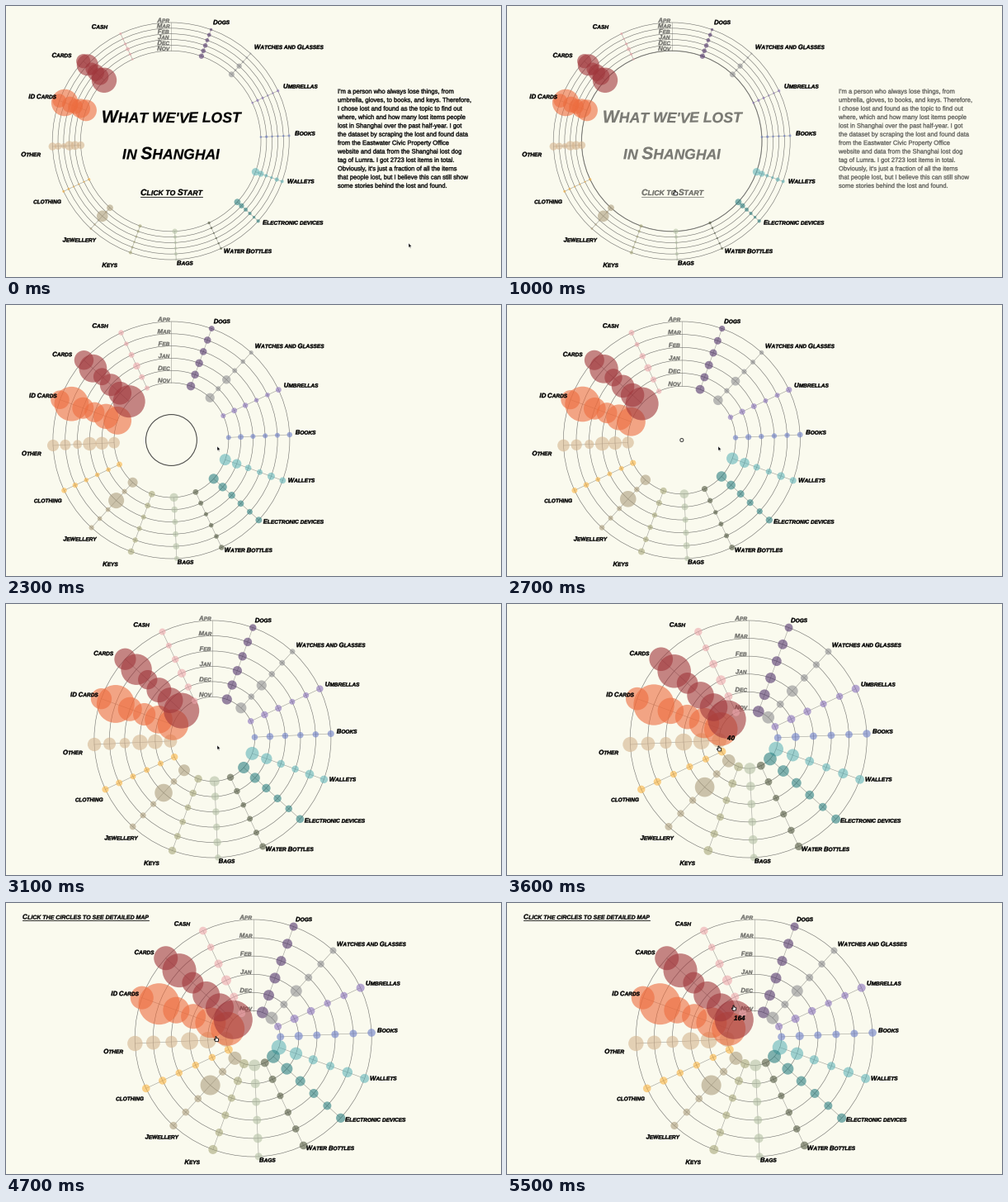
A matplotlib script that plays this animation: 600 px wide and 328 px high, repeating every 5.6 s.

```python
import math
import random

import matplotlib.pyplot as plt
import numpy as np
from matplotlib.animation import FuncAnimation
from matplotlib.patches import Circle, PathPatch, Polygon
from matplotlib.path import Path
from matplotlib.textpath import TextPath
from matplotlib.transforms import Affine2D

W, H, DPI = 600, 328, 100
STEP, FRAMES = 100, 56
BG = "#fafaee"
CX, CY, R_OUT = 199.7, 163.5, 143.5
R_START, R_MID, R_END = 109.3, 69.7, 33.0
HAND = {"family": "Liberation Sans", "weight": "bold", "style": "italic"}
BODY = {"family": "Liberation Sans"}
MONTHS = ["Nov", "Dec", "Jan", "Feb", "Mar", "Apr"]

# name, label x, label middle y, colour, final radius per month
ITEMS = [
    ("Dogs", 251, 19.5, "#52346c", [7, 6.5, 6.5, 6, 6, 5]),
    ("Watches and Glasses", 301, 49.5, "#8e8e91", [7.5, 4.5, 7, 4.5, 4.2, 4]),
    ("Umbrellas", 336, 97, "#8971bc", [4.5, 5, 4.8, 4.2, 4.3, 5]),
    ("Books", 350, 154, "#6c7dc8", [4.5, 5, 4.5, 4.5, 4.5, 4.8]),
    ("Wallets", 341, 212, "#61b4b9", [9, 7.6, 5.5, 5, 6.2, 5.5]),
    ("Electronic devices", 311, 262, "#2c8082", [8, 7, 6, 5.5, 5, 5.6]),
    ("Water Bottles", 264, 296.5, "#50573f", [5, 4.5, 4, 4.2, 4.3, 4.8]),
    ("Bags", 207, 311, "#b4c1a5", [7, 5.5, 5, 5, 5.5, 4.5]),
    ("Keys", 135, 313.5, "#a7a77a", [5.5, 5, 4.5, 4.5, 4.7, 5.5]),
    ("Jewellery", 109, 283, "#ad9e7d", [8, 4.6, 12, 4.3, 4.3, 4.6]),
    ("clothing", 67, 236.5, "#fab443", [5, 4.2, 4.2, 4.2, 4.7, 4.8]),
    ("Other", 42, 179.5, "#d5b48e", [9, 10, 10.5, 7.2, 8.5, 9.2]),
    ("ID Cards", 61, 109.5, "#ed6c3e", [20.5, 18.5, 15, 16, 25, 14]),
    ("Cards", 79.5, 59.5, "#a0363b", [23.5, 17, 16.5, 13, 20.5, 14.5]),
    ("Cash", 123, 25, "#eda7ac", [4.5, 5, 6, 5, 4.2, 4.8]),
]

STORY = """I'm a person who always lose things, from
umbrella, gloves, to books, and keys. Therefore,
I chose lost and found as the topic to find out
where, which and how many lost items people
lost in Shanghai over the past half-year. I got
the dataset by scraping the lost and found data
from the Eastwater Civic Property Office
website and data from the Shanghai lost dog
tag of Lumra. I got 2723 lost items in total.
Obviously, it's just a fraction of all the items
that people lost, but I believe this can still show
some stories behind the lost and found."""

random.seed(4)
fig = plt.figure(figsize=(W / DPI, H / DPI), dpi=DPI, facecolor=BG)
ax = fig.add_axes([0, 0, 1, 1])
ax.set_xlim(0, W)
ax.set_ylim(H, 0)
ax.axis("off")
wheel = Affine2D()


def px(width):
    return width * 72 / DPI


def reach(text, size):
    return TextPath((0, 0), text, size=size, prop=HAND).get_extents().x1


def lettering(text, size):
    """Small-caps marker lettering; returns its outline and width."""
    parts, x = [], 0
    for ch in text:
        s = size * (1.2 if ch.isupper() or ch.isdigit() else 1)
        if ch != " ":
            glyph = TextPath((0, 0), ch.upper(), size=s, prop=HAND)
            tilt = Affine2D().rotate_deg(random.uniform(-2, 2))
            tilt.translate(x, random.uniform(-0.02, 0.02) * size)
            parts.append(tilt.transform_path(glyph))
        x += reach(ch.upper() + "I", s) - reach("I", s)
    return Path.make_compound_path(*parts), x


def put(path, x, y, color="black", on_wheel=False, lw=0.0, z=6):
    path = Affine2D().scale(1, -1).translate(x, y).transform_path(path)
    patch = PathPatch(path, fc=color, ec=color, lw=px(lw), zorder=z)
    if on_wheel:
        patch.set_transform(wheel + ax.transData)
    return ax.add_patch(patch)


def write(text, x, y, size, align=0.0, **kw):
    path, width = lettering(text, size)
    return put(path, x - align * width, y, **kw)


def underlined(text, x, y, size, gap=1.6):
    path, width = lettering(text, size)
    line, = ax.plot([x, x + width], [y + gap] * 2, color="black", lw=px(0.8), zorder=6)
    return [put(path, x, y, lw=0.3), line]


def ring(lw, color, z):
    c = Circle((CX, CY), R_START, fill=False, ec=color, lw=px(lw), zorder=z)
    c.set_transform(wheel + ax.transData)
    return ax.add_patch(c)


def polar(deg, r):
    a = math.radians(deg)
    return CX + r * math.sin(a), CY - r * math.cos(a)


def cubic(t, start, length):
    u = min(max((t - start) / length, 0), 1)
    return 4 * u ** 3 if u < 0.5 else 1 - 4 * (1 - u) ** 3


def fade(t, start, length):
    return min(max((t - start) / length, 0), 1)


# wheel
rings = [ring(0.6, "#747470", 2) for _ in MONTHS]
disc = ring(1.1, "#4c4c4a", 3)
angles = [19.9 + 22.5 * i for i in range(len(ITEMS))]
spokes = []
for deg in angles + [0]:
    line, = ax.plot([], [], color="#a3a39c", lw=px(0.6), zorder=1)
    line.set_transform(wheel + ax.transData)
    spokes.append((deg, line))

bubbles = []
for deg, (name, lx, ly, color, sizes) in zip(angles, ITEMS):
    write(name, lx, ly + 2.6, 6.5, align=0 if deg < 180 else 1, on_wheel=True, lw=0.4)
    for k, size in enumerate(sizes):
        dot = Circle((CX, CY), size, fc=color, ec="none", alpha=0.6, zorder=4)
        dot.set_transform(wheel + ax.transData)
        ax.add_patch(dot)
        bubbles.append((deg, k, size, dot))
months = [write(m, CX - 9, 0, 6.5, align=0.5, color="#6e6e6a", lw=0.3, z=3)
          for m in MONTHS]

# opening text
intro = [
    write("What we've lost", 116, 141, 17.6, lw=0.2),
    write("in Shanghai", 141, 185.5, 17.5, lw=0.2),
] + underlined("Click to Start", 163, 229, 8.7)
for i, row in enumerate(STORY.split("\n")):
    intro.append(put(TextPath((0, 0), row, size=7.6, prop=BODY),
                     402, 105.8 + 10.38 * i, color="#111111", lw=0.4))
hint = underlined("Click the circles to see detailed map", 20, 19.6, 7.0, gap=1.2)
tips = [
    (3500, 3900, write("40", 267, 165, 6.8, lw=0.3, z=7)),
    (5200, 5600, write("164", 275, 142, 6.8, lw=0.3, z=7)),
]

# pointer
ARROW = np.array([(0, 0), (0, 5.4), (1.2, 4.3), (2.1, 6.2), (2.9, 5.8), (2.1, 4.0), (3.7, 3.9)])
PALM = np.array([(-1, -3), (0, -3), (0.2, -1), (2, -0.8), (2.8, 0), (2.3, 3),
                 (-1, 3), (-2.6, 0.6), (-2, -0.1), (-1, 0.8)])
arrow = ax.add_patch(Polygon(ARROW, fc="black", ec="white", lw=px(0.4), zorder=9))
palm = ax.add_patch(Polygon(PALM, fc="white", ec="black", lw=px(0.8), zorder=9))
STOPS = [(0, 488, 287), (100, 488, 287), (800, 204, 226), (1000, 204, 226),
         (1450, 256, 171), (3400, 256, 171), (3600, 257, 175), (4000, 250, 174),
         (4500, 250, 174), (5200, 275, 127), (5600, 275, 127)]


def pointer(t):
    for (t0, x0, y0), (t1, x1, y1) in zip(STOPS, STOPS[1:]):
        if t <= t1:
            u = (t - t0) / (t1 - t0)
            u = u * u * (3 - 2 * u)
            return np.array([x0 + (x1 - x0) * u, y0 + (y1 - y0) * u])


def draw(n):
    t = n * STEP
    slide = cubic(t, 2045, 2100)
    inner = R_START + (R_MID - R_START) * cubic(t, 1400, 900) + (R_END - R_MID) * slide
    grow = (R_START - inner) / (R_START - R_END)
    shift = 100 * slide
    wheel.clear().translate(shift, 0)
    radii = np.linspace(inner, R_OUT, len(MONTHS))

    for r, circle, label in zip(radii, rings, months):
        circle.set_radius(r)
        label.set_transform(Affine2D().translate(shift, CY - r - 0.2) + ax.transData)
    for deg, line in spokes:
        ends = [polar(deg, inner), polar(deg, R_OUT)]
        line.set_data(*zip(*ends))
    for deg, k, size, dot in bubbles:
        base = (size - 2.7) / 1.37
        dot.set_center(polar(deg, radii[k]))
        dot.set_radius(base + (size - base) * grow)

    gone = fade(t, 850, 300)
    for part in intro:
        part.set_alpha(1 - gone)
    disc.set_radius(max(R_START * (1 - cubic(t, 1350, 1620)), 0.01))
    disc.set_alpha(gone)
    disc.set_visible(t < 2950)
    for part in hint:
        part.set_alpha(fade(t, 4050, 650))
    for start, end, tip in tips:
        tip.set_visible(start <= t < end)

    spot = pointer(t)
    grab = t >= 3400 or 700 <= t <= 1000
    arrow.set_xy(ARROW + spot)
    palm.set_xy(PALM + spot)
    arrow.set_visible(not grab)
    palm.set_visible(grab)
    return []


anim = FuncAnimation(fig, draw, frames=FRAMES, interval=STEP,
                     init_func=lambda: draw(0), repeat=True, repeat_delay=0)
plt.show()
```
